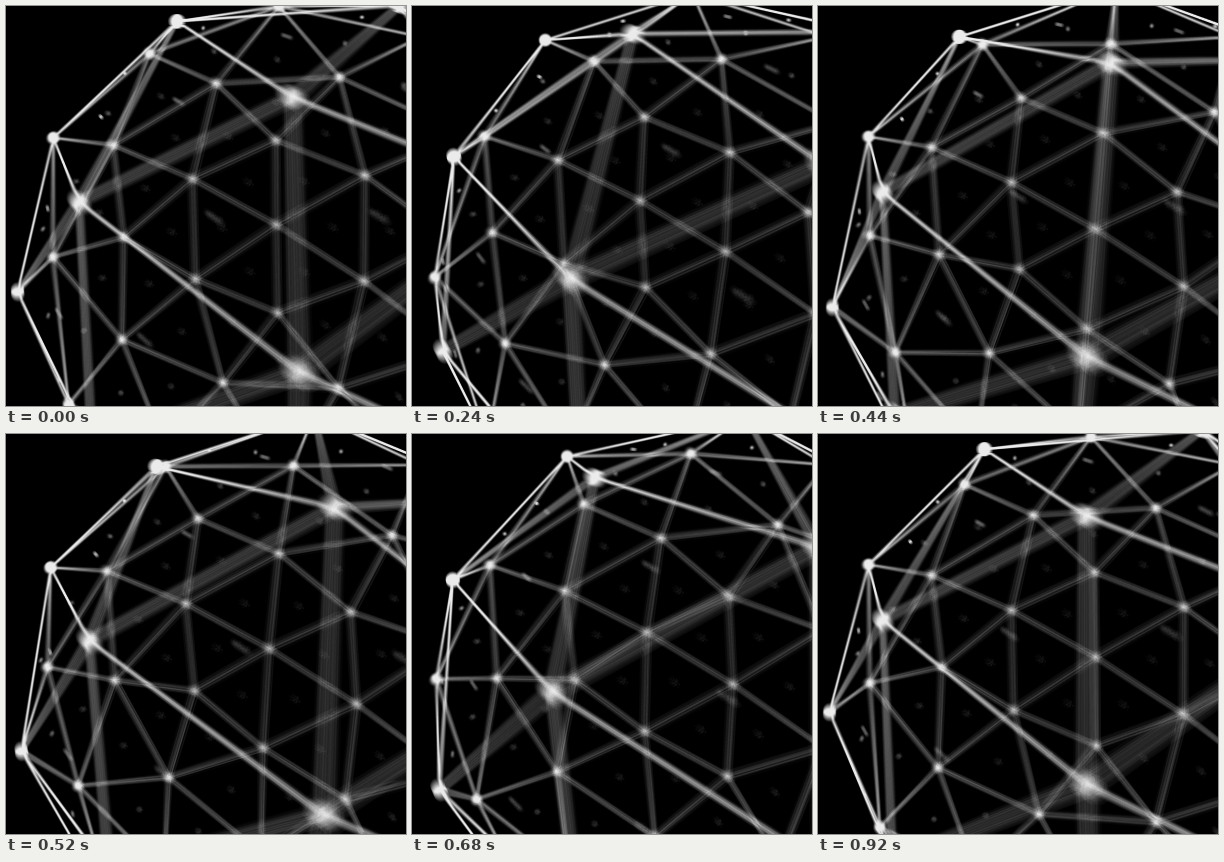
Recreate the animation shown at these times as an HTML page with a canvas. Size 400 by 400 pixels, loop 0.96 s.

```html
<!DOCTYPE html>
<html lang="en">
<head>
<meta charset="utf-8">
<title>Rotating geodesic sphere</title>
<style>
  html, body { margin: 0; width: 100%; height: 100%; overflow: hidden; background: #000; }
  canvas { display: block; width: 400px; height: 400px; }
</style>
</head>
<body>
<canvas id="stage" width="400" height="400"></canvas>
<script>
const SIZE = 400, FRAMES = 24, FRAME_MS = 40;
const STEP = 72 / FRAMES;          // degrees turned per frame
const SHUTTER = 0.9;
const SAMPLES = 47, SAMPLE_ALPHA = 5 / 255; // full coverage adds up to a soft white
const FOCUS = 0.72, LENS = 5.5;    // focal depth, aperture radius
const EDGE = 0.8, NODE = 5.2, SPECK = 1.3; // radii at unit depth
const RAD = Math.PI / 180;

// Geodesic sphere: an icosahedron standing on a vertex, each edge split once.
const onRing = (deg, z) => {
  const r = Math.sqrt(1 - z * z);
  return [r * Math.cos(deg * RAD), r * Math.sin(deg * RAD), z];
};
const distance = (a, b) => Math.hypot(a[0] - b[0], a[1] - b[1], a[2] - b[2]);
const average = (...pts) => [0, 1, 2].map(i => pts.reduce((sum, p) => sum + p[i], 0) / pts.length);
const normalize = p => p.map(v => v / Math.hypot(...p));

const corners = [[0, 0, 1], [0, 0, -1]];
for (let i = 0; i < 5; i++) {
  corners.push(onRing(54 + 72 * i, Math.sqrt(0.2)), onRing(18 + 72 * i, -Math.sqrt(0.2)));
}
const nodes = corners.slice();
corners.forEach((a, i) => corners.slice(i + 1).forEach(b => {
  if (distance(a, b) < 1.1) nodes.push(normalize(average(a, b)));
}));

const edges = [], specks = [];
const linked = (i, j) => distance(nodes[i], nodes[j]) < 0.7;
for (let i = 0; i < nodes.length; i++) {
  for (let j = i + 1; j < nodes.length; j++) {
    if (!linked(i, j)) continue;
    edges.push([i, j]);
    for (let k = j + 1; k < nodes.length; k++) {
      if (linked(i, k) && linked(j, k)) specks.push(average(nodes[i], nodes[j], nodes[k]));
    }
  }
}

// Tilted perspective camera, with lens offset (lx, ly) growing away from the focal depth.
function projector(degrees, lx, ly) {
  const ca = Math.cos((degrees - 40) * RAD), sa = Math.sin((degrees - 40) * RAD);
  return ([x, y, z]) => {
    const c = x * ca - y * sa, s = x * sa + y * ca;
    const depth = 1 + 0.5487 * c - 0.08445 * z;
    const defocus = 1 / depth - 1 / FOCUS;
    return {
      x: (275.4 + 128.4 * c - 209.5 * s + 104.2 * z) / depth + lx * defocus,
      y: (252.1 + 77.9 * c - 122.6 * s - 223.8 * z) / depth + ly * defocus,
      scale: 1 / depth
    };
  };
}

function addDot(ctx, p, radius) {
  const r = radius * p.scale;
  if (p.x < -r || p.y < -r || p.x > SIZE + r || p.y > SIZE + r) return;
  ctx.moveTo(p.x + r, p.y);
  ctx.arc(p.x, p.y, r, 0, 2 * Math.PI);
}

function addEdge(ctx, a, b) {
  const pad = 5;
  if (Math.max(a.x, b.x) < -pad || Math.min(a.x, b.x) > SIZE + pad ||
      Math.max(a.y, b.y) < -pad || Math.min(a.y, b.y) > SIZE + pad) return;
  const length = Math.hypot(b.x - a.x, b.y - a.y);
  const nx = EDGE * (b.y - a.y) / length, ny = EDGE * (a.x - b.x) / length;
  ctx.moveTo(a.x + nx * a.scale, a.y + ny * a.scale);
  ctx.lineTo(b.x + nx * b.scale, b.y + ny * b.scale);
  ctx.lineTo(b.x - nx * b.scale, b.y - ny * b.scale);
  ctx.lineTo(a.x - nx * a.scale, a.y - ny * a.scale);
  ctx.closePath();
}

// Averages many instants and lens positions: motion blur plus depth of field.
function renderFrame(index) {
  const canvas = document.createElement('canvas');
  canvas.width = canvas.height = SIZE;
  const ctx = canvas.getContext('2d');
  ctx.fillStyle = '#000';
  ctx.fillRect(0, 0, SIZE, SIZE);
  ctx.globalCompositeOperation = 'lighter';
  ctx.globalAlpha = SAMPLE_ALPHA;
  ctx.fillStyle = '#fff';
  for (let i = 0; i < SAMPLES; i++) {
    const time = index + SHUTTER * ((i + 0.5) / SAMPLES - 0.5);
    // Evenly spread, unrelated sequences keep the smears free of bands.
    const radius = LENS * Math.sqrt((0.5 + i * 0.7549) % 1);
    const angle = 2 * Math.PI * i * 0.5698;
    const project = projector(time * STEP, radius * Math.cos(angle), radius * Math.sin(angle));
    const points = nodes.map(project);
    ctx.beginPath();
    edges.forEach(([a, b]) => addEdge(ctx, points[a], points[b]));
    points.forEach(p => addDot(ctx, p, NODE));
    specks.forEach(s => addDot(ctx, project(s), SPECK));
    ctx.fill();
  }
  return canvas;
}

const stage = document.getElementById('stage').getContext('2d');
const cache = [];
const start = performance.now();
let shown = -1;

function draw() {
  const elapsed = performance.now() - start;
  const index = Math.floor(elapsed / FRAME_MS) % FRAMES;
  if (index !== shown) {
    cache[index] = cache[index] || renderFrame(index);
    stage.drawImage(cache[index], 0, 0);
    shown = index;
  }
  requestAnimationFrame(draw);
}
draw();
</script>
</body>
</html>
```
